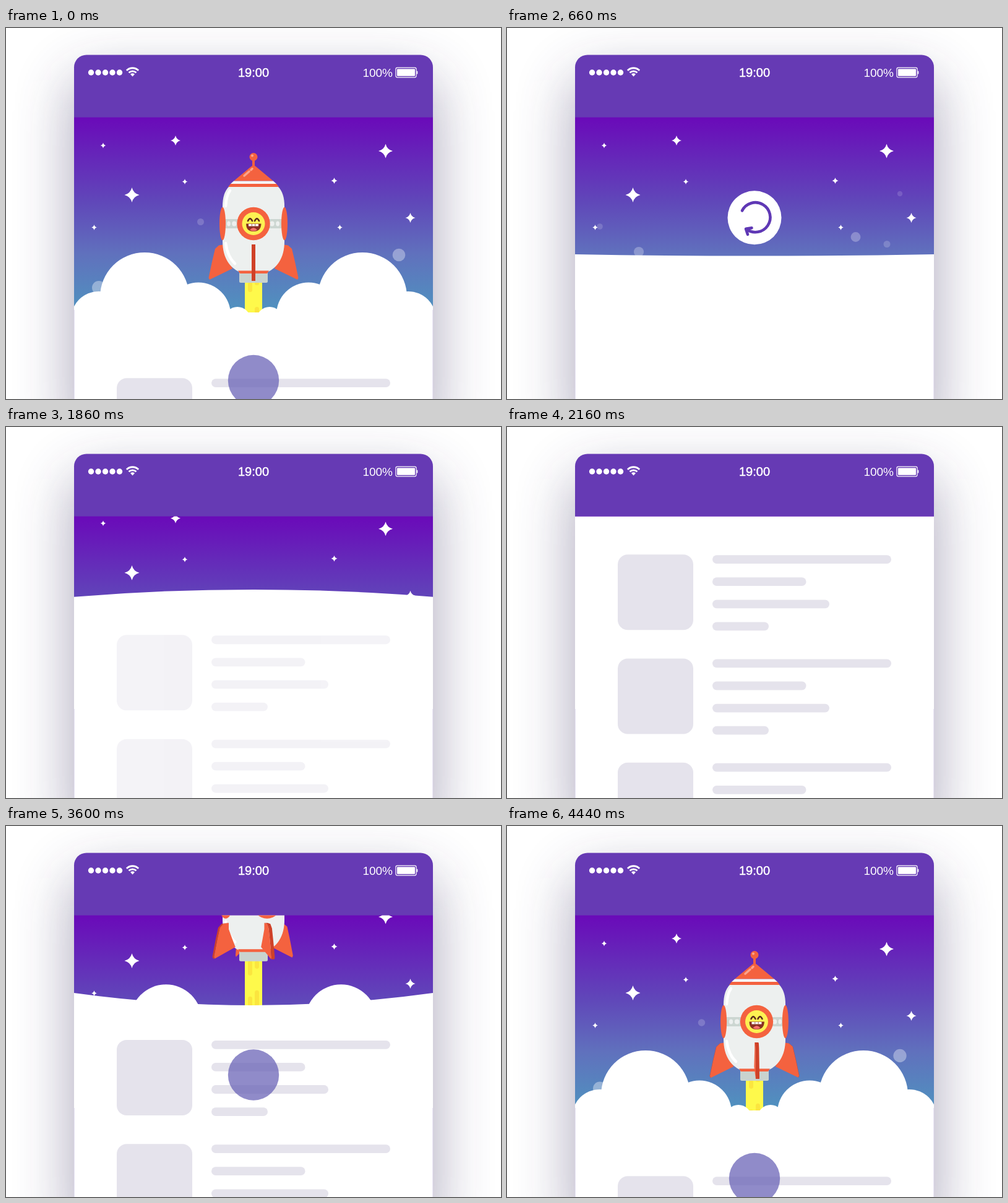
Animation of 800x600 px, one loop 4.47 s. Source, as an HTML page:

```html
<!DOCTYPE html>
<html lang="en">
<head>
<meta charset="utf-8">
<title>Pull to refresh</title>
<style>
  html, body { margin: 0; width: 100%; height: 100%; overflow: hidden; background: #fff; }
  svg { display: block; width: 800px; height: 600px; }
  text { font-family: "Liberation Sans", Arial, sans-serif; fill: #fff; }
</style>
</head>
<body>
<svg viewBox="0 0 800 600">
  <defs>
    <linearGradient id="sky" gradientUnits="userSpaceOnUse" x1="0" y1="145" x2="0" y2="460">
      <stop offset="0" stop-color="#6a0ab9"/>
      <stop offset=".43" stop-color="#6047b9"/>
      <stop offset=".7" stop-color="#6071bd"/>
      <stop offset="1" stop-color="#4f93bf"/>
    </linearGradient>
    <filter id="blur" filterUnits="userSpaceOnUse" x="-100" y="-100" width="1000" height="1000">
      <feGaussianBlur stdDeviation="48"/>
    </filter>
    <clipPath id="screen"><rect x="110" y="144.5" width="580" height="460"/></clipPath>
  </defs>

  <rect width="800" height="600" fill="#fff"/>
  <rect x="110" y="84" width="580" height="590" rx="20" fill="#372d5f" opacity=".44" filter="url(#blur)"/>
  <rect x="110" y="43.5" width="580" height="640" rx="20" fill="#663ab4"/>

  <g clip-path="url(#screen)">
    <rect x="110" y="144" width="580" height="460" fill="url(#sky)"/>
    <g id="stars" fill="#fff"></g>
    <g id="bubbles" fill="#fff"></g>
    <g id="rocket"></g>
    <g id="spinner">
      <circle r="43.5" fill="#fff"/>
      <path id="arrow" fill="none" stroke="#5f38b5" stroke-width="4.6" stroke-linecap="round" stroke-linejoin="round"
        d="M-20-11.5A24 24 0 1 1-13 18.5M-11 27L-14 18L-4.500 16.500"/>
    </g>
    <g id="white" fill="#fff"></g>
    <g id="list" fill="#e5e3ec"></g>
    <circle id="finger" cx="400" fill="#6a63b7"/>
  </g>
  <path d="M110.300 456V600M689.700 456V600" stroke="#ddd8ee" stroke-width=".8"/>

  <g fill="#fff">
    <g id="signal"></g>
    <path d="M204.500 78.500L201 74.700A5 5 0 0 1 208 74.700Z"/>
    <path id="wifi" fill="none" stroke="#fff" stroke-width="2.800"
      d="M198.500 72.300A8.500 8.500 0 0 1 210.500 72.300M194.900 68.700A13.600 13.600 0 0 1 214.100 68.700"/>
    <text x="400" y="78.700" font-size="20" text-anchor="middle" stroke="#fff" stroke-width=".5">19:00</text>
    <text x="625" y="78.700" font-size="19" text-anchor="end">100%</text>
    <rect x="630" y="64.200" width="33" height="15.600" rx="2.200" fill="none" stroke="#fff" stroke-width="1.200"/>
    <rect x="632" y="66.200" width="29" height="11.600" rx=".8"/>
    <rect x="663.800" y="69.500" width="1.500" height="5" rx=".6"/>
  </g>
</svg>

<script>
const LOOP = 4470, STEP = 30, TOP = 144.5, CX = 400;
const PULL = 3180, CLOSE = 1650, CLOSED = 2130;
const ORANGE = '#f4623f', RED = '#cf4128';
const $ = id => document.getElementById(id);
const clamp = x => Math.max(0, Math.min(1, x));
const ease = x => (1 - Math.cos(Math.PI * clamp(x))) / 2;
const span = (t, a, b) => clamp((t - a) / (b - a));
const mod = (a, n) => ((a % n) + n) % n;
const circle = (x, y, r, extra = '') => `<circle cx="${x}" cy="${y}" r="${Math.max(0, r)}" ${extra}/>`;
const rect = (x, y, w, h, r, fill) =>
  `<rect x="${x}" y="${y}" width="${w}" height="${h}" rx="${r}"${fill ? ` fill="${fill}"` : ''}/>`;
const poly = (pts, fill) => `<polygon points="${pts.map(p => p.join()).join(' ')}" fill="${fill}"/>`;

// Eased value through [time, value] keys
function keyed(t, keys) {
  if (t <= keys[0][0]) return keys[0][1];
  for (let i = 1; i < keys.length; i++) {
    const [a, u] = keys[i - 1], [b, v] = keys[i];
    if (t <= b) return u + (v - u) * ease((t - a) / (b - a));
  }
  return keys[keys.length - 1][1];
}

const EDGE = [[0, 454.5], [360, 309], [720, 370], [940, 360], [1080, 362.3], [CLOSE, 362.3], [CLOSED, TOP]];
const MIDDLE = [[0, 460], [360, 286.5], [720, 374.5], [940, 360], [1080, 362.3], [CLOSE, 362.3], [CLOSED, TOP]];
const SPINNER = [[520, 415], [780, 222], [940, 262], [1080, 256.5], [CLOSE, 256.5], [1860, 400]];
const STARS = [[157, 190, 4.5], [274, 182, 8], [203.5, 270, 12], [289, 248.5, 4.5], [142.5, 322.5, 4.5],
  [530.5, 247, 5], [613.5, 199, 11.5], [653.5, 307, 8], [539.5, 322.5, 4.5]];
// x, y, time at that y, y where it vanishes
const BUBBLES = [[314.5, 313.5, 0, 225], [635, 367, 0, 200], [150, 420, 0, 243],
  [563.5, 266, 1140, 210], [614, 277.5, 1140, 261], [213, 290, 1140, 232]];
// x, rest radius, rest offset, extra depth while hidden
const SIDE_CLOUDS = [[311, 52, 4, 64], [150, 45, 15, 60], [374, 21, 12, 40]];

$('stars').innerHTML = STARS.map(([x, y, r]) => {
  const k = r * .2;
  return `<path transform="translate(${x} ${y})" d="M0 ${-r}Q${k} ${-k} ${r} 0Q${k} ${k} 0 ${r}Q${-k} ${k} ${-r} 0Q${-k} ${-k} 0 ${-r}Z"/>`;
}).join('');

$('signal').innerHTML = [0, 1, 2, 3, 4].map(i => circle(137.5 + i * 11.5, 72, 4.7)).join('');

$('list').innerHTML = [0, 1, 2].map(i => {
  const y = 206.2 + i * 168.3;
  return rect(179, y, 122, 122, 16) +
    [289, 151.5, 189, 91].map((w, j) => rect(332, y + 1 + j * 36.1, w, 13.8, 6.9)).join('');
}).join('');

function fin(a) {
  const s = Math.sin(a), c = Math.cos(a), dy = 2 * c;
  const at = (pts, shift) => pts.map(([r, y]) => [r * s + shift, y + (r > 60 ? dy : 0)]);
  const outer = [[46, 350], [56, 351.5], [62, 357], [67, 378], [72.5, 404], [71, 407]];
  const inner = [[34, 389], [40, 375], [46, 360]];
  const near = -Math.sign(s) * 3 * Math.abs(c);
  return poly(at([...outer, ...inner], near), ORANGE) +
    (c > -.1 ? poly([...at(outer, 3 * c), ...at(outer, -3 * c).reverse()], RED) : '');
}

function porthole(a) {
  const c = Math.cos(a), x = 50 * Math.sin(a);
  const face = c < .2 ? '' : `<g transform="scale(${c} 1)">` +
    circle(0, 0, 18.5, 'fill="#fdf152"') +
    `<path d="M-9-4.500Q-5.500-12-2-4.500M2-4.500Q5.500-12 9-4.500" fill="none" stroke="#5b2a1c" stroke-width="2.600" stroke-linecap="round"/>
     <path d="M-12 0H12.500Q12 12.500 0 12.500T-12 0Z" fill="#8a2f22"/>
     <path d="M-6 10Q0 3 6 10Q0 14-6 10Z" fill="#f5706b"/>
     <path d="M-8 .5H8V4H-8Z" fill="#fff"/><path d="M-2.700 .5V4M2.700 .5V4" stroke="#8a2f22" stroke-width=".8"/></g>`;
  return `<g transform="translate(${x} 316.500)"><ellipse rx="${Math.max(5, 26.7 * c)}" ry="26.700" fill="${ORANGE}"/>${face}</g>`;
}

function flame(t) {
  const e = 16 + .077 * (t > PULL ? t - LOOP : t);
  let out = rect(-14, 408, 28, 244, 0, '#fef94b');
  const streak = (x, from, to) => {
    const a = Math.max(0, from), b = Math.min(236, to);
    return b > a ? rect(x, 411 + a, 7, b - a, 3.5, '#fbe53f') : '';
  };
  for (let i = 0; i < 5; i++) {
    const end = mod(e, 75) + i * 75;
    out += streak(-9, end - 41, end) + streak(2, end - 51, end - 11);
  }
  return out;
}

function rocket(t) {
  const turn = mod(-t, LOOP) / 7.5 * Math.PI / 180;
  const quarters = [0, 1, 2, 3].map(i => turn + i * Math.PI / 2);
  const depth = (a, b) => Math.cos(a) - Math.cos(b);
  const front = quarters.filter(a => Math.cos(a) > .1).sort(depth);
  const back = quarters.filter(a => Math.cos(a) <= .1).sort(depth);
  const rivets = quarters.flatMap(a => [-.9, -.64, .64, .9].slice(2).map(d => a + d)).filter(a => Math.cos(a) > .1);
  return flame(t) + back.map(fin).join('') +
    rect(-23, 394, 46, 18, 2.5, '#c9d3cf') +
    `<path d="M-39 256C-47 263-50 275-50 288V345C-50 372-38 388-22 395H22C38 388 50 372 50 345V288C50 275 47 263 39 256Z" fill="#edf0ef"/>
     <path d="M-38 263Q-44 271-45 288M-45 348Q-42 370-30 381" fill="none" stroke="#fff" stroke-width="4.500" stroke-linecap="round"/>
     <path d="M-25 392.500H25L22 397H-22Z" fill="${ORANGE}"/>` +
    rect(-50, 309, 100, 15, 0, '#ccd6d1') +
    rivets.map(a => `<ellipse cx="${50 * Math.sin(a)}" cy="316.500" rx="${4.8 * Math.cos(a)}" ry="4" fill="#edf0ef"/>`).join('') +
    `<path d="M0 221.500Q3 223 5 225L32 247.500H-32L-5 225Q-3 223 0 221.500Z" fill="${ORANGE}"/>
     <path d="M-32 247.500H32L37 252H-37Z" fill="#f7f8f8"/>
     <path d="M-37 252H37L41 257H-41Z" fill="${ORANGE}"/>
     <path d="M-15 239L-7 232M-4 229.500L-2 227.500" stroke="#fba48c" stroke-width="3.500" stroke-linecap="round"/>
     <path d="M0 210V224" stroke="${ORANGE}" stroke-width="4"/>` +
    circle(0, 208.5, 6.5, `fill="${ORANGE}"`) + circle(-2, 206.5, 2, 'fill="#fba48c"') +
    quarters.filter(a => Math.cos(a) > -.1).sort(depth).map(porthole).join('') +
    front.map(fin).join('');
}

function whiteArea(edge, mid, p) {
  const base = x => edge + (mid - edge) * (1 - ((x - CX) / 290) ** 2);
  let out = `<path d="M110 ${edge}Q${CX} ${2 * mid - edge} 690 ${edge}V605H110Z"/>`;
  if (p > 0) {
    const both = (x, y, r) => circle(x, y, r) + circle(800 - x, y, r);
    const x = 280.4 - 56.4 * p;
    out += both(x, base(x) + 62 - 85 * p, 49 + 23 * p);
    for (const [cx, r, rest, deep] of SIDE_CLOUDS)
      out += both(cx, base(cx) + rest + deep * (1 - p), r * (.67 + .33 * p));
  }
  return out;
}

function draw(t) {
  const pulling = t >= PULL;
  const p = pulling ? ease((t - PULL) / 981) : 0;
  const closing = span(t, CLOSE, CLOSED);
  let edge, mid, clouds, lift, listY, listAlpha;

  if (pulling) {
    const sag = Math.sin(Math.PI * p);
    edge = TOP + 310 * p + 5.5 * sag;
    mid = edge + 5.5 * p + 19 * sag;
    clouds = p;
    lift = -316 * (1 - p);
    listY = 360 * p;
    listAlpha = 1;
  } else {
    edge = keyed(t, EDGE);
    mid = keyed(t, MIDDLE) - 12 * Math.sin(Math.PI * closing);
    clouds = 1 - ease(t / 300);
    lift = -266 * (t / 360) ** 2;
    listY = t < CLOSE ? 360 - 18 * (t / 540) ** 2 : edge - TOP;
    listAlpha = t < CLOSE ? 1 - span(t, 180, 540) : closing;
  }

  const drift = pulling ? -85 * (1 - p) : -85 * ease(closing);
  $('stars').setAttribute('transform', `translate(0 ${drift})`);
  $('bubbles').innerHTML = BUBBLES.map(([x, y0, t0, end]) => {
    const dt = mod(t - t0 + LOOP / 2, LOOP) - LOOP / 2;
    const y = y0 - .15 * dt;
    return y > end && y < 500 ? circle(x, y, Math.min(11, .062 * (y - end)), `opacity="${(y - end) / 480}"`) : '';
  }).join('');

  $('rocket').setAttribute('transform', `translate(${CX} ${lift})`);
  $('rocket').innerHTML = pulling || t < 600 ? rocket(t) : '';

  const spinning = t > 510 && t < CLOSED;
  $('spinner').setAttribute('visibility', spinning ? 'visible' : 'hidden');
  $('spinner').setAttribute('transform', `translate(${CX} ${keyed(t, SPINNER)})`);
  $('arrow').setAttribute('transform', `rotate(${360 * ease(span(t, 1110, 1620))})`);

  $('white').innerHTML = whiteArea(edge, mid, clouds);
  $('list').setAttribute('transform', `translate(0 ${listY})`);
  $('list').setAttribute('opacity', listAlpha);

  const press = pulling ? span(t, PULL, PULL + 180) : 1 - span(t, 0, 180);
  $('finger').setAttribute('cy', 208 + 362 * (pulling ? ease((t - PULL) / 802) : 1));
  $('finger').setAttribute('r', 60 - 18.8 * press);
  $('finger').setAttribute('opacity', .74 * press);
}

const start = performance.now();
function tick() {
  const t = mod(performance.now() - start, LOOP);
  draw(Math.floor(t / STEP) * STEP);
  requestAnimationFrame(tick);
}
draw(0);
requestAnimationFrame(tick);
</script>
</body>
</html>
```
